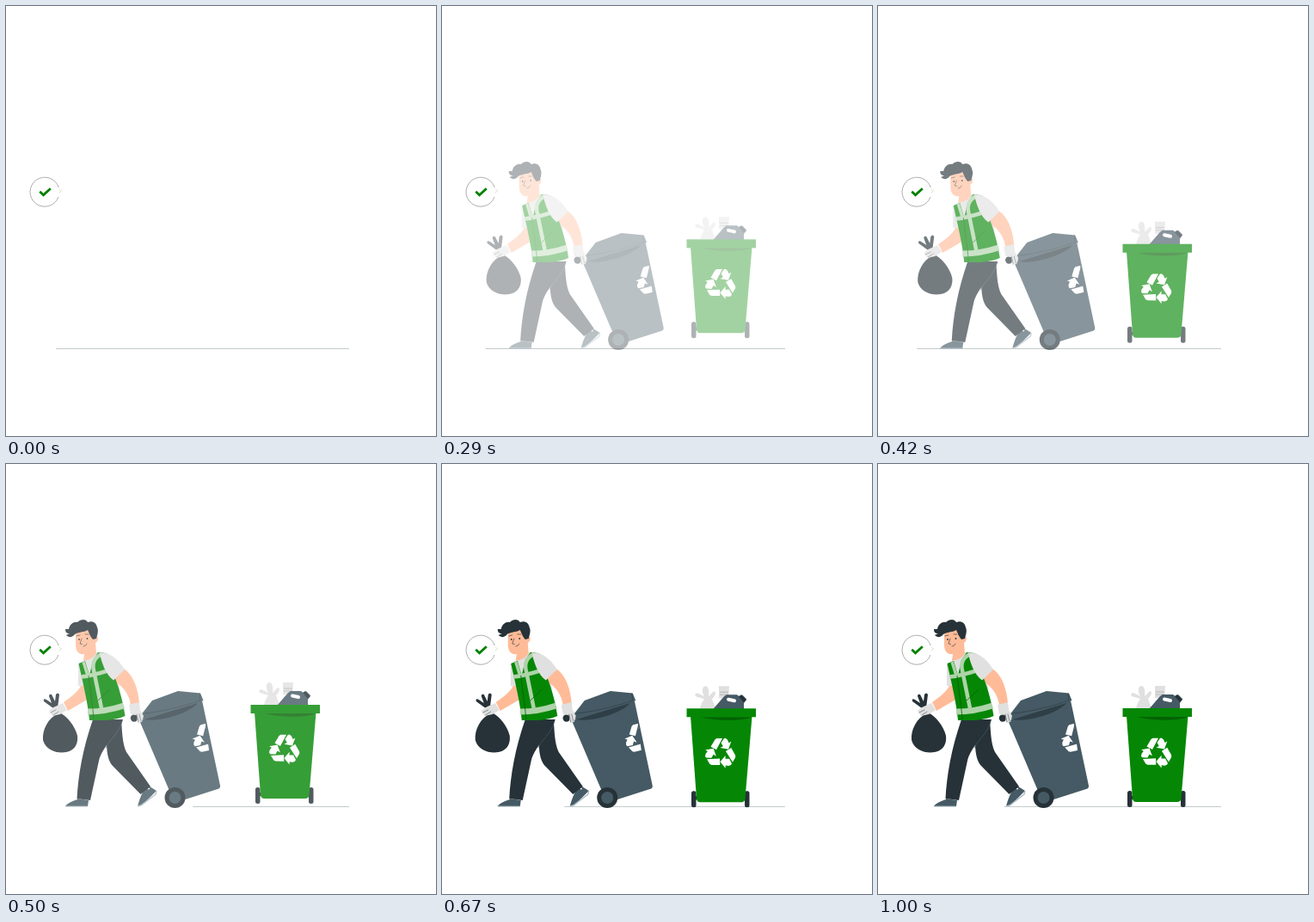
Write an HTML page that moves like this. It is 500 px wide and 500 px high and loops after 1040 ms.

```html
<!DOCTYPE html>
<html lang="en">
<head>
<meta charset="utf-8">
<title>Waste collection</title>
<style>
html, body { margin: 0; width: 100%; height: 100%; overflow: hidden; background: #fff }
svg { display: block; width: 100%; height: 100% }
.dark { fill: #263238 }
.slate { fill: #455a64 }
.green { fill: #058705 }
.skin { fill: #ffbb98 }
.cloth { fill: #e0e0e0 }
.thin { fill: none; stroke: #263238; stroke-width: .8; stroke-linecap: round }
</style>
</head>
<body>
<svg viewBox="0 0 500 500">
  <defs>
    <path id="arrow" d="M-11.500-7.500-6.500-16-4.500-17.300H2L-5-4ZM4-17.300H6L8-15.500 9.500-12 12.300-13.600 9-4.500-.5-6.200 2.800-8 .5-12Z"/>
    <g id="recycle" fill="#fff">
      <use href="#arrow"/>
      <use href="#arrow" transform="rotate(120)"/>
      <use href="#arrow" transform="rotate(240)"/>
    </g>
    <clipPath id="side"><path d="M205 295H227L233 340H205Z"/></clipPath>
  </defs>

  <line id="ground" x2="399" y1="398.5" y2="398.5" stroke="#c4cacc"/>

  <g fill="none">
    <path d="M61.200 211A17 17 0 1 0 61 222" stroke="#999" stroke-width=".8"/>
    <path d="M62 212.500 64.500 215 62 217" stroke="#d6d6b4" stroke-width=".8"/>
    <path d="M39.300 215.800 43.500 219.800 51.800 212.200" stroke="green" stroke-width="2.800"/>
  </g>

  <g id="bin">
    <g class="cloth">
      <path d="M300 284C301 279 303 276 305 273L295 270C293 267 296 265 299 267L305 270C302 265 302 259 306 258 310 258 311 264 310 270L316 264C319 264 319 268 314 273L318 284Z"/>
      <path d="M322 258H334L333 272H322Z"/>
      <path d="M323 265H333M323 268H333" stroke="#aaa" stroke-width=".8"/>
    </g>
    <path class="slate" d="M315 285 328 270 331 268H343L347 271 349 268 354 273 351 278V285Z"/>
    <path d="M333 273.500 340 275" stroke="#fff" stroke-width="4" stroke-linecap="round"/>
    <path class="dark" d="M345 270 348 268 354 274 351 277Z"/>
    <rect class="dark" x="290" y="380" width="5.500" height="19" rx="2.500"/>
    <rect class="dark" x="352" y="380" width="5.500" height="19" rx="2.500"/>
    <path class="dark" d="M292 386H355V390H292Z"/>
    <path class="green" d="M289 293H360.500L352.500 389Q352 393 348 393H300Q296.500 393 296 389Z"/>
    <path d="M302 294H360C351 299 317 299 302 294Z" fill="#036303"/>
    <rect class="green" x="284.500" y="284" width="80.500" height="10"/>
    <use href="#recycle" x="324" y="336"/>
  </g>

  <g id="man">
    <!-- wheeled container -->
    <path class="slate" d="M151 298 224 275 245 374Q245.500 377 242 378L192 394Z"/>
    <path d="M156 297 219 278C211 289 174 301 156 297Z" fill="#2f3f47"/>
    <path class="slate" d="M152 293 166 275 196 264 222 266.500 225.500 275 156 297Z"/>
    <path class="thin" d="M157 290C176 288 203 282 222 275L221 267" style="stroke-width:.5"/>
    <g clip-path="url(#side)"><use href="#recycle" transform="translate(231 319) rotate(-14)"/></g>
    <circle class="dark" cx="192.500" cy="388" r="12"/>
    <circle class="slate" cx="192.500" cy="388" r="7"/>

    <!-- carried bag -->
    <path class="skin" d="M84 255C82 262 76 268 63 277L68 287 92 273V255Z"/>
    <path class="dark" d="M57 290C45 295 38 309 39 321 42 333 56 337 66 335 77 333 80 324 79 316 76 304 67 294 60 290Z"/>
    <path class="dark" d="M51 284 40 276Q39 272 43 274L49 278 46 270Q46 267 49 268L53 276 54 268Q56 265 58 268L56 284Z"/>
    <path class="cloth" d="M46 287 51 283 62 278 67 286 59 291 50 293Z"/>
    <path class="thin" d="M48 289 54 286M51 292 57 288" style="stroke-width:.5"/>

    <!-- legs and shoes -->
    <path class="slate" d="M160 373 171 380 155 396 149 398C151 390 154 382 160 373Z"/>
    <path d="M171 380 170 384 153 397 149 398" fill="none" stroke="#b0bec5" stroke-width="1.500"/>
    <circle cx="162" cy="377.500" r="1" fill="#fff"/>
    <path class="slate" d="M79 389 92 391 91 398H65Q67 394 79 390Z"/>
    <path d="M65 398H91" stroke="#90a4ae"/>
    <path class="dark" d="M113 324 130 297C131 309 131 325 136 335L164 375 152.500 384 121 352Q113 345 113 324Z"/>
    <path class="dark" d="M97 297H132C128 312 108 328 104 345L94 391 78.500 389C80 362 85 332 97 297Z"/>
    <path d="M131 299C128 313 115 322 112 330" fill="none" stroke="#455a64" stroke-width=".7"/>

    <!-- body -->
    <path class="cloth" d="M80 233 90 225 101 219 114 220 126 230 129 278 94 287 88 258H80Z"/>
    <path class="skin" d="M120 250 133 238C144 245 150 262 151 279L141 280C139 270 136 262 122 252Z"/>
    <path class="green" d="M80.500 232 88 229 93 246 97 228 103 219 112 220C117 236 130 260 134.500 293 121 299 106 298 93 298 91 276 85 253 80.500 232Z"/>
    <g fill="none" stroke="#add3a8" stroke-width="4.500">
      <path d="M83.500 247.500C98 246 109 242 119 239"/>
      <path d="M91 288C106 288 121 285 133 281" stroke-width="7"/>
      <path d="M107 221C99 225 96 232 98 240L107 284"/>
      <path d="M86 230 91 246" stroke-width="3.500"/>
    </g>
    <path d="M92 246C94 265 97 281 98 297M103 275 117 262" fill="none" stroke="#056005" stroke-width=".8"/>
    <path class="cloth" d="M105 220C114 219 124 223 134 239L121 251.500C112 245 107 231 105 220Z"/>
    <circle class="dark" cx="145" cy="295.500" r="4.200"/>
    <path class="cloth" d="M139 280 151 277 152 286 156 293 154 300 149 301 148 292 141 291Z"/>
    <path class="thin" d="M151 291 153 299M148 291 150 300" style="stroke-width:.5"/>

    <!-- head -->
    <path class="skin" d="M77 196 97 190 99 201C103 198 105 205 100 208L101 220C97 227 89 229 86 228L87 221C80 222 77 217 77 210Z"/>
    <path class="dark" d="M76 198C73 202 69 202 66 199L70 197C66 197 65 195 65 192L69 192C70 186 75 183 79 184 83 180 89 180 91 184 97 182 101 185 102 190 104 194 102 199 101 203L97 204C94 201 93 197 91 193 86 196 80 195 76 198Z"/>
    <path class="thin" d="M78 200 82 199M88 198 92 198M84 203 82 209 84.500 209.500M86 212Q89 212 90 209" style="stroke-width:.6"/>
    <circle class="dark" cx="81" cy="204" r=".9"/>
    <circle class="dark" cx="90.500" cy="203" r=".9"/>
  </g>
</svg>
<script>
const LOOP = 1040, FPS = 24, SLIDE = 20;
const [ground, bin, man] = ['ground', 'bin', 'man'].map(id => document.getElementById(id));

const cubic = (a, b, s) => 3 * a * s * (1 - s) ** 2 + 3 * b * s * s * (1 - s) + s ** 3;

// cubic-bezier(.36, -.01, .5, 1.38): overshoots, then settles
function ease(x) {
  let lo = 0, hi = 1;
  for (let i = 0; i < 24; i++) {
    const mid = (lo + hi) / 2;
    if (cubic(.36, .5, mid) < x) lo = mid; else hi = mid;
  }
  return cubic(-.01, 1.38, hi);
}

function draw(now) {
  const step = Math.floor(now % LOOP * FPS / 1000 + .121);
  const p = step < 2 ? 0 : ease(Math.min(1, step / FPS + .03));
  const off = SLIDE * (1 - p);
  man.setAttribute('transform', `translate(${off} 0)`);
  bin.setAttribute('transform', `translate(0 ${-off})`);
  for (const part of [man, bin]) part.setAttribute('opacity', Math.max(0, Math.min(1, p)));
  ground.setAttribute('x1', p < .7 ? 38 + off : Math.max(133, 217 - 350 * (p - .8)));
}

const start = performance.now();
function tick() {
  draw(performance.now() - start);
  requestAnimationFrame(tick);
}
tick();
</script>
</body>
</html>
```
